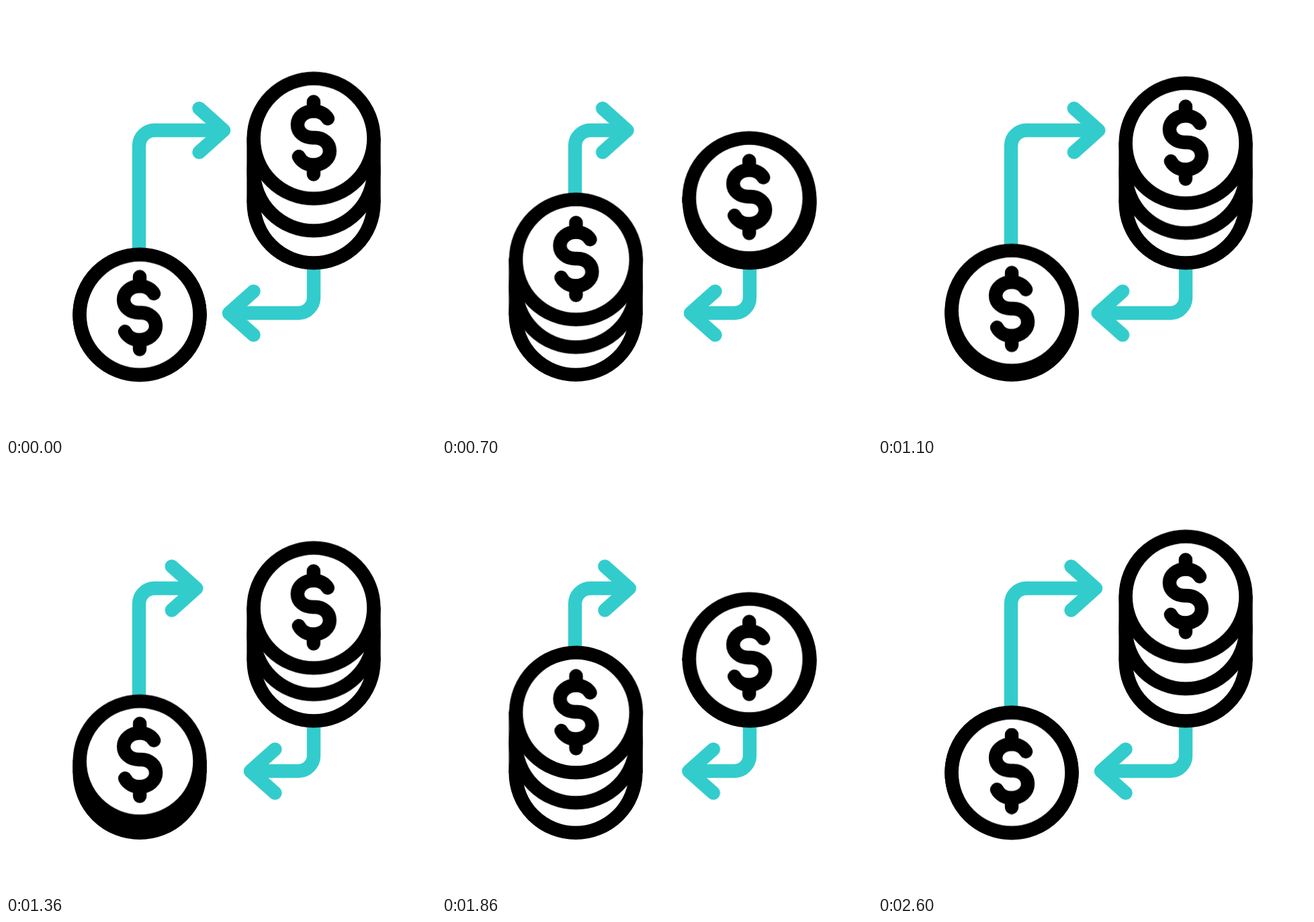
Animation, 640 px wide and 640 px high, one loop 2820 ms. Source, as an HTML page without scripts:

```html
<!DOCTYPE html>
<html lang="en">
<head>
<meta charset="utf-8">
<title>Coin exchange</title>
<style>
  html, body { margin: 0; width: 100%; height: 100%; overflow: hidden; background: #fff; }
  svg { display: block; width: 100vw; height: 100vh; }

  .coin { fill: #fff; }
  .ink { stroke: #000; stroke-width: 20.4; stroke-linecap: round; stroke-linejoin: round; }
  .line { fill: none; }
  .arrow { stroke: #33cccc; stroke-width: 20.4; fill: none; stroke-linejoin: round; }
  .head { stroke-linecap: round; }

  .drop, .lift, .push { animation: 2820ms cubic-bezier(.333, 0, .667, 1) infinite; }
  .drop { animation-name: drop; }
  .lift { animation-name: lift; }
  .push { animation-name: push; }

  /* coins travel 600 ms each way, twice, then rest */
  @keyframes drop {
    0%, 42.5532%, 85.1064%, 100% { transform: none; }
    21.2766%, 63.8298% { transform: translate(var(--x), var(--y)); }
  }
  @keyframes lift {
    0%, 42.5532%, 85.1064%, 100% { transform: none; }
    21.2766%, 63.8298% {
      transform: translate(var(--x), var(--y));
      animation-timing-function: cubic-bezier(.167, 0, .667, 1);
    }
  }
  /* 400 ms out, 300 ms strokes, 400 ms back to rest */
  @keyframes push {
    0%, 92.1986%, 100% { transform: none; }
    14.1844%, 35.461%, 56.7376%, 78.0142% { transform: translateX(var(--out)); }
    24.8227%, 46.0993%, 67.3759% { transform: translateX(var(--in)); }
  }
</style>
</head>
<body>
<svg viewBox="0 0 640 640">
  <defs>
    <circle id="coin" class="coin ink" r="89.4"/>
    <path id="sides" class="line ink" stroke-linecap="butt" d="M-89.4 0V110M89.4 0V110"/>
    <path id="dollar" class="line ink" d="M0 -56.5V-43M0 38V51.5
      M21 -31.5C17 -38.5 8.5 -42.5 0 -42.5C-13.5 -42.5 -24 -33.5 -24 -22.5C-24 -11 -14 -3 -1.5 -3
      H2C14.5 -3 24 5.5 24 16.5C24 28.5 13.5 37.5 0 37.5C-9.5 37.5 -18 33 -22 25"/>
    <clipPath id="aboveRight"><path d="M340 0H580V293H340Z"/></clipPath>
    <clipPath id="aboveLeft"><path d="M80 0H320V459.5H80Z"/></clipPath>
    <clipPath id="topShaft"><path d="M221 120H420V250H221Z"/></clipPath>
    <clipPath id="lowShaft"><path d="M240 390H435V520H240Z"/></clipPath>
  </defs>

  <g class="arrow">
    <path d="M198 460V208A23 23 0 0 1 221 185H221.5"/>
    <g clip-path="url(#topShaft)">
      <g class="push" style="--out: 23.2px; --in: -48.5px">
        <path d="M190 185H324"/>
        <path class="head" d="M287.5 152.4L324 185L287.5 217.6"/>
      </g>
    </g>
    <path d="M458 293V434A23 23 0 0 1 435 457H434.5"/>
    <g clip-path="url(#lowShaft)">
      <g class="push" style="--out: -19.6px; --in: 38px">
        <path d="M480 457H332"/>
        <path class="head" d="M368.5 424.6L332 457.1L368.5 489.6"/>
      </g>
    </g>
  </g>

  <g>
    <use href="#coin" x="458" y="293"/>
    <use href="#coin" x="458" y="245.1" class="drop" style="--x: -.4px; --y: 47.9px"/>
    <g clip-path="url(#aboveRight)">
      <use href="#sides" x="458" y="197.2" class="drop" style="--x: -.7px; --y: 95.8px"/>
    </g>
    <use href="#coin" x="458" y="197.2" class="drop" style="--x: -.7px; --y: 95.8px"/>
    <use href="#dollar" x="457.8" y="199" class="drop" style="--x: -.6px; --y: 94.9px"/>
  </g>

  <g>
    <use href="#coin" x="199" y="459.5"/>
    <use href="#coin" x="199" y="459.5" class="lift" style="--x: .2px; --y: -47.9px"/>
    <g clip-path="url(#aboveLeft)">
      <use href="#sides" x="199" y="459.5" class="lift" style="--x: .5px; --y: -95.9px"/>
    </g>
    <use href="#coin" x="199" y="459.5" class="lift" style="--x: .5px; --y: -95.9px"/>
    <use href="#dollar" x="199" y="459.5" class="lift" style="--x: .5px; --y: -93.9px"/>
  </g>
</svg>
</body>
</html>
```
